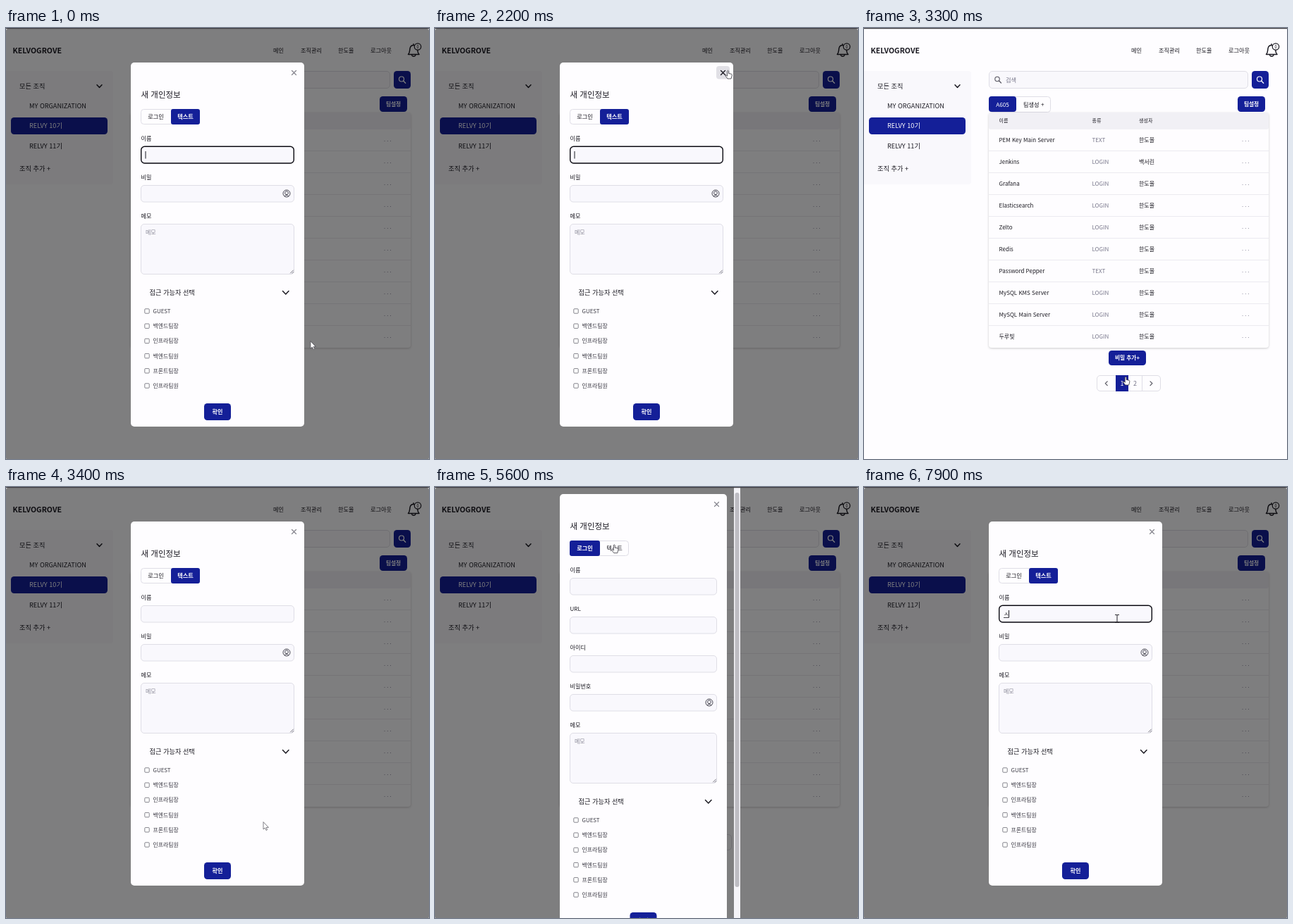
An HTML page that plays this animation: 600 by 612 pixels, repeating every 8 s.

```html
<!DOCTYPE html>
<html lang="ko">
<head>
<meta charset="utf-8">
<style>
html, body { margin: 0; width: 100%; height: 100%; overflow: hidden; background: #fefdff; }
svg { display: block; width: 600px; height: 612px; }
text { font-family: "Noto Sans CJK KR", "Noto Sans CJK", "Noto Sans", sans-serif; white-space: pre; }
</style>
</head>
<body>
<svg id="stage" viewBox="0 0 600 612"></svg>
<script>
const BLUE = '#141f98', INK = '#1b1a22', GRAY = '#77768a', EDGE = '#dfdee6', PAPER = '#fefdff';
const LOOP = 8000, STEP = 100;

const rect = (x, y, w, h, fill, r = 0, extra = '') =>
  `<rect x="${x}" y="${y}" width="${w}" height="${h}" rx="${r}" fill="${fill}" ${extra}/>`;
const box = (x, y, w, h, fill, r, stroke = EDGE, sw = 1) =>
  rect(x, y, w, h, fill, r, `stroke="${stroke}" stroke-width="${sw}"`);
// y is the vertical middle of the letters
const text = (x, y, s, size = 8, fill = INK, weight = 400, anchor = 'start') =>
  `<text x="${x}" y="${y + size * 0.37}" font-size="${size}" fill="${fill}" font-weight="${weight}" text-anchor="${anchor}">${s}</text>`;
const line = (d, stroke = INK, sw = 1, fill = 'none') =>
  `<path d="${d}" fill="${fill}" stroke="${stroke}" stroke-width="${sw}" stroke-linecap="round" stroke-linejoin="round"/>`;
const ring = (x, y, r, stroke, sw, fill = 'none') =>
  `<circle cx="${x}" cy="${y}" r="${r}" fill="${fill}" stroke="${stroke}" stroke-width="${sw}"/>`;
const group = (id, body) => `<g id="${id}">${body}</g>`;
const shift = (x, y, body) => `<g transform="translate(${x} ${y})">${body}</g>`;
const button = (x, y, w, h, label, size = 7.7) =>
  rect(x, y, w, h, BLUE, 4.5) + text(x + w / 2, y + h / 2, label, size, '#fff', 700, 'middle');

function header() {
  const nav = [[379, '메인'], [418, '조직관리'], [471, '한도율'], [517, '로그아웃']];
  return text(9.5, 32, 'KELVOGROVE', 10.6, INK, 700) +
    nav.map(([x, s]) => text(x, 32, s, 8.2)).join('') +
    line('M570.5 37.5C573 35 572.5 32 573 29C573.5 26 575.5 24.5 578 24.5C581 24.5 583 26 583.4 29C583.8 32 583.5 35 586 37.5Z', INK, 1.5) +
    line('M575.5 38C576 41 580.5 41 581 38M578 24.5V22.8', INK, 1.4) +
    ring(584, 26.5, 4.7, INK, 1.2, PAPER) + text(584, 26.5, '0', 5.5, INK, 400, 'middle');
}

function sidebar() {
  return rect(-4, 61, 156, 161, '#f9f8fc', 4) + rect(7, 127, 137, 24, BLUE, 4.5) +
    text(19, 82.5, '모든 조직', 9.2) + line('M129 80.7L132.5 84.4L136 80.7', INK, 1.5) +
    text(33, 111, 'MY ORGANIZATION', 9.2) + text(33, 139, 'RELVY 10기', 9.2, '#fff') +
    text(33, 167.5, 'RELVY 11기', 9.2) + text(19, 200, '조직 추가 +', 9.2);
}

function table() {
  const names = ['PEM Key Main Server', 'Jenkins', 'Grafana', 'Elasticsearch', 'Zelto', 'Redis',
    'Password Pepper', 'MySQL KMS Server', 'MySQL Main Server', '두루빛'];
  const rows = names.map((name, i) => {
    const y = 159 + 31 * i;
    return (i ? rect(177, y - 16, 397, 1, '#ebeaf0') : '') + text(191.5, y, name) +
      text(323.5, y, i % 6 ? 'LOGIN' : 'TEXT', 8, GRAY) +
      text(390, y, i === 1 ? '백서린' : '한도율') + text(536, y - 0.5, '. . .', 7.5, GRAY);
  }).join('');
  return rect(177, 120, 397, 334, PAPER, 4, 'style="filter:drop-shadow(0 1.5px 1.5px #0003)"') +
    rect(177, 120, 397, 24, '#f1f0f5', 3) +
    text(191.5, 131.5, '이름', 7) + text(323.5, 131.5, '종류', 7) + text(390, 131.5, '생성자', 7) + rows;
}

function page() {
  return rect(0, 0, 600, 612, PAPER) + header() + sidebar() +
    box(177.5, 61.5, 367, 24, '#f9f8fc', 4.5) + ring(189, 72.5, 3.2, '#55545f', 1.1) +
    line('M191.5 75L194.5 78', '#55545f', 1.2) + text(201, 73.5, '검색', 8.2, GRAY) +
    rect(550, 61, 24, 25, BLUE, 4.5) + ring(561, 72.5, 3.5, '#fff', 1.2) + line('M563.7 75.2L566.7 78.2', '#fff', 1.3) +
    box(177.5, 97.5, 87, 22, PAPER, 4) + rect(177, 97, 39, 22, BLUE, 4) +
    text(196.5, 108.5, 'A605', 8.2, '#fff', 500, 'middle') + text(226, 108.5, '팀생성 +', 8.2) +
    button(530, 97, 39, 22, '팀설정') + table() + button(347, 458, 53, 21, '비밀 추가+') +
    box(330.5, 493.5, 90, 22, PAPER, 4.5) + rect(357, 493, 18, 23, BLUE) + rect(394, 494, 1, 21, EDGE) +
    line('M345.2 501.8L342.3 504.7L345.2 507.6M406 501.8L408.9 504.7L406 507.6', '#55545f', 1.2) +
    text(366, 504.5, '1', 9, '#fff', 400, 'middle') + text(384.5, 504.5, '2', 9, GRAY, 400, 'middle');
}

function tabs(loginActive) {
  const [x, w] = loginActive ? [191, 43] : [234, 41];
  const label = (cx, s, on) => text(cx, 126, s, 8.2, on ? '#fff' : INK, on ? 700 : 400, 'middle');
  return box(191.5, 115.5, 83, 21, PAPER, 4) + rect(x, 115, w, 22, BLUE, 3) +
    label(212.5, '로그인', loginActive) + label(254.5, '텍스트', !loginActive);
}

const closeMark = (color, sw) => line('M405.5 60.5L411.5 66.5M411.5 60.5L405.5 66.5', color, sw);

// extra: added height for further fields, narrow: width taken by a scrollbar
function form(fields, loginActive, narrow = 0) {
  const extra = 55 * (fields.length - 2);
  const inner = 217 - narrow;
  const roles = ['GUEST', '백엔드팀장', '인프라팀장', '백엔드팀원', '프론트팀장', '인프라팀원'];
  const inputs = fields.map((s, i) =>
    text(191.5, 157 + 55 * i, s, 8.1) + box(191.5, 168.5 + 55 * i, inner, 23.5, '#f9f8fd', 4.5)).join('');
  const eye = ring(398, 235, 5, '#4b4a55', 1) + ring(398, 234.2, 2.4, '#4b4a55', 1) +
    line('M394.8 238.5Q398 236 401.2 238.5', '#4b4a55', 0.9);
  const resizer = line('M403.5 348L407.5 344M406 348.3L407.8 346.5', '#55545f', 0.8);
  const chevron = line('M392.5 373.5L396.8 378L401 373.5', INK, 1.5);
  const lower = text(191.5, 267, '메모', 8.1) + box(191.5, 278.5, inner, 71, '#f9f8fd', 4.5) +
    text(198, 290, '메모', 8, '#8b8a98') + text(203.5, 375.5, '접근 가능자 선택', 9.2) +
    shift(-narrow, 0, eye + resizer + chevron) +
    roles.map((s, i) => box(196.8, 398.8 + 21.2 * i, 6.4, 6.4, '#fff', 1, '#77767f', 0.9) +
      text(208.5, 402 + 21.2 * i, s, 7.9, '#3b3a44')).join('') +
    button(281 - narrow / 2, 533, 38, 24, '확인', 8.1);
  return rect(177, 49, 246 - narrow, 517 + extra, PAPER, 5) + shift(-narrow, 0, closeMark('#85848d', 1.2)) +
    text(191.5, 95, '새 개인정보', 11.5) + tabs(loginActive) + inputs + shift(0, extra, lower);
}

const scrollbar = rect(424, 1, 9, 611, '#f5f4f8') + rect(425.5, 8, 6, 560, '#bdbcc2', 3);

const cursors =
  group('arrow', line('M0 0V10L2.4 8L4 11.5L5.6 10.7L4.1 7.4H7Z', '#4b4a52', 0.7, '#fff')) +
  group('hand', line('M-1 6V1Q0 -.5 1 1V4.5L5 5.3Q6 5.8 5.6 8L4.5 12H-.5L-3.5 8Q-3.7 6.5 -2.3 7L-1 8Z', '#33323a', 0.8, '#fff')) +
  group('beam', line('M-2.5 -5.5H-.8L0 -5L.8 -5.5H2.5M0 -5V5M-2.5 5.5H-.8L0 5L.8 5.5H2.5', '#222128', 1));

const stage = document.getElementById('stage');
stage.innerHTML = page() +
  group('shade', rect(0, 1, 600, 612, '#000', 3, 'opacity=".5"')) +
  group('textForm', form(['이름', '비밀'], false)) +
  group('loginForm', shift(0, -39, form(['이름', 'URL', '아이디', '비밀번호'], true, 9)) + scrollbar) +
  group('closeHover', rect(399, 54, 19, 18.5, '#e1e0e6', 4) + closeMark(INK, 1.4)) +
  group('loginHover', rect(192, 116, 42, 20.5, '#f2f1f7', 3) + text(212.5, 126, '로그인', 8.2, BLUE, 400, 'middle')) +
  group('loginRing', box(191.2, 115.2, 43, 22, 'none', 4, BLUE, 1.7)) +
  group('focus', box(191.7, 168.2, 216.6, 23.8, 'none', 5, '#0c0b12', 1.4)) +
  group('typed', text(198, 180, 'ㅅ', 8.2) + rect(198, 185, 7.5, 0.8, INK)) +
  group('caret', rect(0, 175, 1, 10.5, INK)) +
  rect(0, 0, 600, 1.2, '#3d3c41') + group('pointer', cursors);

const part = Object.fromEntries([...stage.querySelectorAll('[id]')].map(el => [el.id, el]));
const show = (id, on) => { part[id].style.display = on ? '' : 'none'; };

// time, x, y, pointer shape
const path = [
  [0, 432, 445, 'arrow'], [200, 548, 260], [400, 300, 31], [600, 32, 260], [800, 260, 535], [1000, 450, 412],
  [1200, 557, 220], [1400, 280, 33], [1600, 22, 220], [1800, 300, 340], [2000, 416, 120],
  [2100, 417, 66, 'hand'], [2200, 415.5, 60, 'hand'], [2300, 412, 60, 'arrow'], [2700, 404, 220],
  [3000, 372, 462, 'hand'], [3200, 366, 474, 'hand'], [3400, 365, 476], [3600, 269, 168],
  [3700, 264, 150], [3900, 242, 85], [4200, 236, 104], [4500, 229, 126, 'hand'],
  [4800, 230, 132, 'hand'], [5100, 231, 136, 'beam'], [5200, 236, 120], [5500, 252, 87, 'hand'],
  [5700, 254, 90], [6200, 250, 166], [6300, 256.5, 175, 'beam'], [6500, 256.5, 179, 'beam'], [6600, 256.5, 179, 'beam'],
  [6800, 130, 150], [7000, 220, 395], [7200, 440, 370], [7400, 430, 240], [7500, 359, 206],
  [7600, 359, 187, 'beam'], [7700, 359, 187, 'beam'], [8000, 359, 187, 'beam']
];

// Catmull-Rom curve through four values
const curve = (a, b, c, d, k) =>
  b + 0.5 * k * (c - a + k * (2 * a - 5 * b + 4 * c - d + k * (3 * (b - c) + d - a)));

function movePointer(t) {
  const i = path.findIndex((p, n) => t >= p[0] && t < path[n + 1][0]);
  const near = [-1, 0, 1, 2].map(n => path[Math.max(0, Math.min(path.length - 1, i + n))]);
  const k = (t - path[i][0]) / (path[i + 1][0] - path[i][0]);
  const [x, y] = [1, 2].map(axis => curve(...near.map(p => p[axis]), k));
  const shape = path[i][3] || 'arrow';
  part.pointer.setAttribute('transform', `translate(${x} ${y})`);
  ['arrow', 'hand', 'beam'].forEach(id => show(id, id === shape));
}

function render(now) {
  const t = Math.floor((now % LOOP) / STEP) * STEP;
  const open = t < 2300 || t >= 3400;
  const login = t >= 5200 && t < 5700;
  const focused = t < 2300 || t >= 7700;
  const typed = t >= 7900;
  movePointer(t);
  show('shade', open);
  show('textForm', open && !login);
  show('loginForm', login);
  show('closeHover', t >= 2100 && t < 2300);
  show('loginHover', t >= 4500 && t < 5200);
  show('loginRing', t >= 5100 && t < 5200);
  show('focus', focused);
  show('typed', typed);
  show('caret', focused && (t >= 7700 || Math.floor(t / 530) % 2 === 0));
  part.caret.setAttribute('transform', `translate(${typed ? 205 : 197.5})`);
}

const start = performance.now();
function tick() {
  render(performance.now() - start);
  requestAnimationFrame(tick);
}
tick();
</script>
</body>
</html>
```
